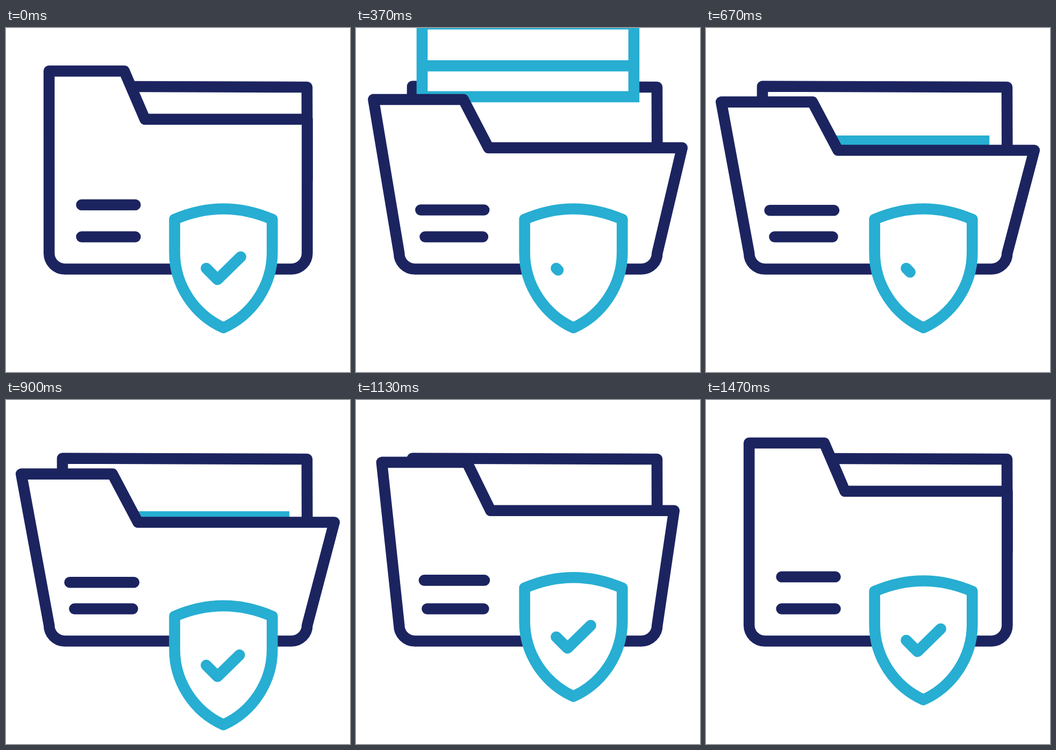
Write an HTML page that moves like this. It is 640 px wide and 640 px high and loops after 1670 ms.

```html
<!DOCTYPE html>
<html lang="en">
<head>
<meta charset="utf-8">
<title>Secure folder</title>
<style>
  html, body { margin: 0; width: 100%; height: 100%; overflow: hidden; background: #fff; }
  svg { display: block; width: 100%; height: 100%; }
  .navy { stroke: #1c2460; }
  .cyan { stroke: #27aed2; }
</style>
</head>
<body>
<svg viewBox="0 0 640 640" fill="none" stroke-width="20.6" stroke-linecap="round" stroke-linejoin="round">
  <path class="navy" d="M105 300V108.5L560 110L560.5 282"/>
  <g id="paper" class="cyan" stroke-linejoin="miter" stroke-linecap="butt">
    <path fill="#fff" d="M123 10.2H517V224H123Z"/>
    <path d="M123 88.5H517M123 166.5H517"/>
  </g>
  <path id="front" class="navy" fill="#fff"/>
  <path id="lines" class="navy"/>
  <g id="shield" class="cyan">
    <path fill="#fff" d="M313.7 356Q404.5 317 495.3 356V418C495.3 478 459 533 404.5 557.7C350 533 313.7 478 313.7 418Z"/>
    <path id="check"/>
  </g>
</svg>
<script>
const LOOP = 1670;
const el = id => document.getElementById(id);
const paper = el('paper'), front = el('front'), lines = el('lines');
const shield = el('shield'), check = el('check');

const mix = (a, b, p) => a + (b - a) * p;
const span = (t, a, b) => Math.min(1, Math.max(0, (t - a) / (b - a)));
const smooth = (t, a, b) => { const x = span(t, a, b); return x * x * (3 - 2 * x); };

// Quick start, soft landing
const launch = x => 0.6 * x * (1 - x) ** 2 + 3 * x * x * (1 - x) + x ** 3;

function track(t, keys) {
  let v = keys[0][1];
  for (let i = 1; i < keys.length; i++) {
    v += (keys[i][1] - keys[i - 1][1]) * span(t, keys[i - 1][0], keys[i][0]);
  }
  return v;
}

function drawFolder(p) {
  const m = (a, b) => mix(a, b, p).toFixed(2);
  const top = m(80, 137.6), step = m(169.7, 227.5);
  front.setAttribute('d',
    `M${m(80.2, 28.3)} ${top}H${m(220, 198)}L${m(258.5, 245.5)} ${step}H${m(560.4, 610.8)}` +
    'L560.4 419A29.5 29.5 0 0 1 531 448.5H109.7A29.5 29.5 0 0 1 80.2 419Z');
  lines.setAttribute('d',
    `M${m(140.6, 118.6)} ${m(329, 339.3)}H${m(240.5, 238)}` +
    `M${m(140.6, 127.5)} 388.5H${m(240.5, 235.5)}`);
}

function drawCheck(p) {
  const a = [372.5, 447], b = [393.5, 468], c = [436.7, 425.7];
  const one = Math.hypot(b[0] - a[0], b[1] - a[1]);
  const two = Math.hypot(c[0] - b[0], c[1] - b[1]);
  const len = p * (one + two);
  const toward = (u, v, k) => `L${mix(u[0], v[0], k)} ${mix(u[1], v[1], k)}`;
  let d = '';
  if (len > 0.01) {
    d = `M${a}` + toward(a, b, Math.min(1, len / one));
    if (len > one) d += toward(b, c, (len - one) / two);
  }
  check.setAttribute('d', d);
}

function draw(t) {
  drawFolder(t < 900 ? launch(span(t, 0, 460)) : 1 - smooth(t, 960, 1370));

  const y = track(t, [[230, -245], [370, -97], [530, 47], [650, 197], [720, 207]]);
  paper.setAttribute('transform', `translate(0 ${y})`);
  paper.style.display = t < 230 || t > 1250 ? 'none' : '';

  const drop = 52 * smooth(t, 670, 960) - 61 * smooth(t, 1035, 1145) + 9 * smooth(t, 1145, 1470);
  shield.setAttribute('transform', `translate(0 ${drop})`);
  drawCheck(t < 500 ? 1 - smooth(t, 0, 433) : smooth(t, 600, 940));
}

const start = performance.now();
function tick() {
  draw((performance.now() - start) % LOOP);
  requestAnimationFrame(tick);
}
draw(0);
requestAnimationFrame(tick);
</script>
</body>
</html>
```
